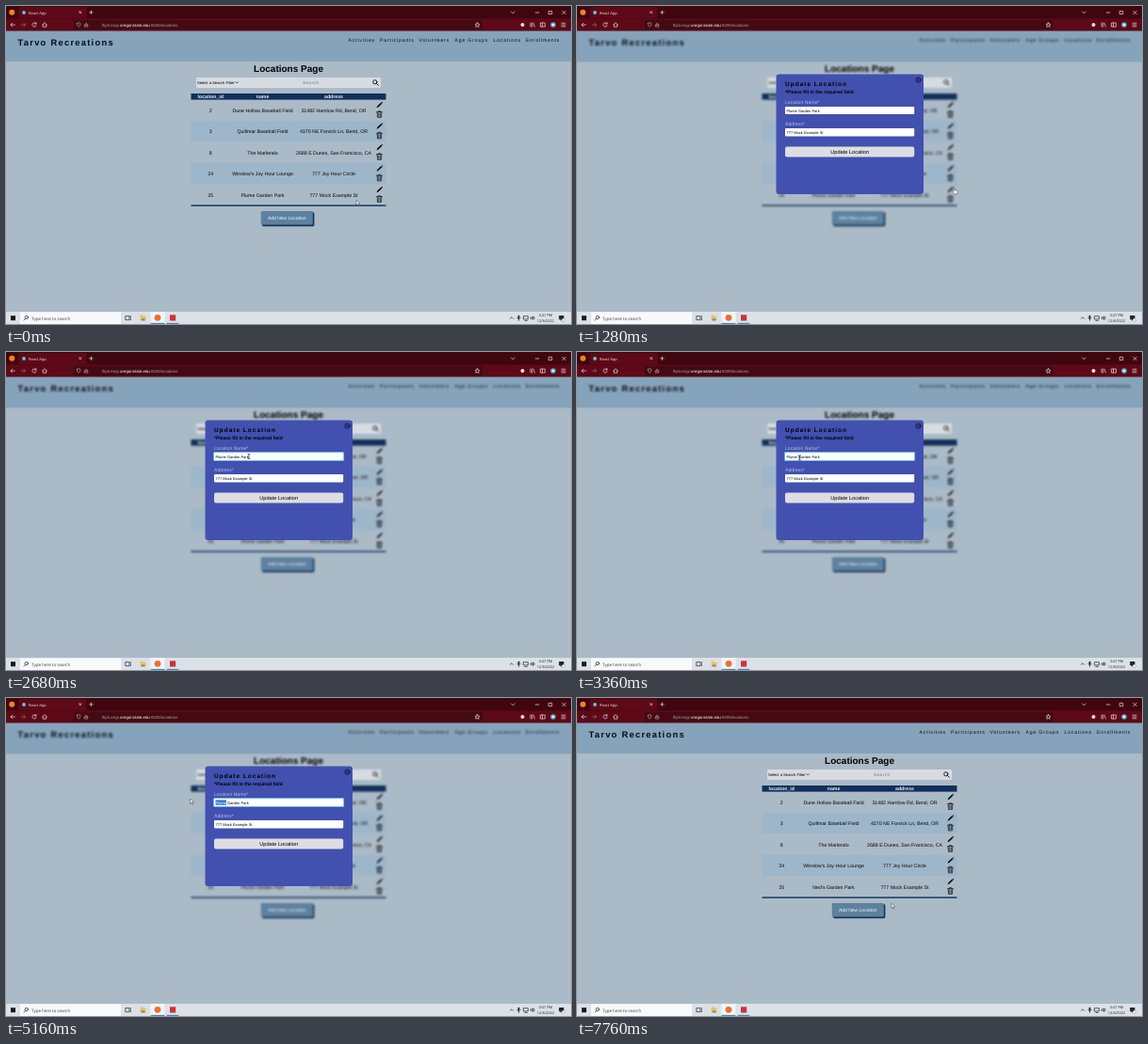
An HTML page that plays this animation: 600 by 338 pixels, repeating every 7800 ms.

```html
<!DOCTYPE html>
<html lang="en">
<head>
<meta charset="utf-8">
<title>Locations</title>
<style>
  html, body { margin: 0; width: 100%; height: 100%; overflow: hidden; background: #abbac7; }
  svg { display: block; width: 100vw; height: 100vh; }
  text { font-family: "Liberation Sans", Arial, sans-serif; text-rendering: geometricPrecision; white-space: pre; }
  .ui { font-family: "Open Sans", "Noto Sans", sans-serif; }
  .line { fill: none; stroke-width: .7; stroke-linecap: round; stroke-linejoin: round; }
</style>
</head>
<body>
<svg id="stage" viewBox="0 0 600 338" preserveAspectRatio="none">
  <defs>
    <g id="pencil">
      <path d="M-3 3 L-2.4 1.2 L1.7 -2.6 L2.8 -1.5 L-1.2 2.4 Z M2.1 -3 L2.7 -3.5 L3.7 -2.5 L3.2 -1.9 Z"/>
    </g>
    <g id="trash" class="line" stroke="#080a0d">
      <path d="M-3 -2.4 H3 M-1 -2.5 V-3.4 H1 V-2.5 M-2.3 -2.2 L-2 3.3 H2 L2.3 -2.2 M-.8 -1 V2.2 M.8 -1 V2.2"/>
    </g>
    <path id="arrow" d="M0 0 V5.2 L1.2 4.1 L2 6 L2.9 5.6 L2.1 3.8 H3.7 Z" fill="#fff" stroke="#111" stroke-width=".4"/>
    <path id="hand" d="M-.6 .3 Q0 -.4 .6 .3 V2.4 L3 3 Q3.5 3.2 3.4 4 L2.9 6.4 H0 L-1.9 3.9 Q-1.6 3 -.6 3.9 Z" fill="#fff" stroke="#111" stroke-width=".4"/>
    <path id="beam" d="M-1 -2.6 Q0 -2.6 0 -2 Q0 -2.6 1 -2.6 M0 -2 V2 M-1 2.6 Q0 2.6 0 2 Q0 2.6 1 2.6" class="line" stroke="#222"/>
  </defs>

  <rect width="600" height="338" fill="#abbac7"/>
  <rect y="20" width="600" height="39" fill="#85a3bb"/>
  <g id="page">
    <rect x="-10" y="16" width="620" height="43" fill="#85a3bb"/>
    <text x="12.5" y="42" font-size="9.4" font-weight="700" letter-spacing="1.25" fill="#090d12">Tarvo Recreations</text>
    <g id="nav" font-size="5.2" letter-spacing=".8" fill="#0b1118"></g>
    <text x="300" y="70.4" font-size="10" font-weight="700" text-anchor="middle">Locations Page</text>

    <rect x="202" y="76" width="196" height="11" rx="1" fill="#d6dce2"/>
    <text x="203" y="83" font-size="4.15">Select a Search Filter</text>
    <path d="M244 80.8 L245.2 82 L246.4 80.8" class="line" stroke="#111"/>
    <text x="315" y="83.2" font-size="4.6" letter-spacing=".5" fill="#707780">Search</text>
    <g class="line" stroke="#111" style="stroke-width:.9"><circle cx="391.8" cy="80.8" r="2.1"/><path d="M393.4 82.4 L395.4 84.4"/></g>

    <rect x="196.5" y="93" width="207" height="6.6" fill="#10305a"/>
    <g id="heads" font-size="5.2" font-weight="700" fill="#eef2f6" text-anchor="middle"></g>
    <g id="rows" font-size="5.25" text-anchor="middle" fill="#05070a"></g>
    <rect x="196.5" y="211.4" width="207" height="1.4" fill="#10305a"/>

    <rect x="272" y="219.2" width="55.4" height="15" rx="1.4" fill="#173657"/>
    <rect x="270.8" y="218" width="55" height="14.4" rx="1.2" fill="#5d81a0"/>
    <text x="298.2" y="227" font-size="5" text-anchor="middle" fill="#f4f7fa">Add New Location</text>
  </g>

  <g id="modal">
    <rect x="211.5" y="72.5" width="156.5" height="127.5" rx="3" fill="#4250b0"/>
    <text x="221" y="84.8" font-size="6.5" font-weight="700" letter-spacing="1">Update Location</text>
    <text x="221" y="93" font-size="5" font-weight="700">*Please fill in the required field</text>
    <g font-size="5.1" fill="#b9bfd9">
      <text x="221" y="104.2">Location Name*</text>
      <text x="221" y="127.3">Address*</text>
    </g>
    <rect id="focus" x="220.1" y="106" width="139" height="10" rx="1.3" fill="#6cb9ea"/>
    <rect x="221" y="106.9" width="137.2" height="8.2" rx=".8" fill="#fff"/>
    <rect x="221" y="130" width="137.2" height="8.4" rx=".8" fill="#fff"/>
    <rect id="selection" y="108.4" height="5.4" fill="#3478cf"/>
    <text x="222.5" y="112.5" font-size="4"><tspan id="word"></tspan><tspan> Garden Park</tspan></text>
    <rect id="caret" y="108.6" width=".4" height="5" fill="#111"/>
    <text x="222.5" y="135.7" font-size="4">777 Mock Example St</text>
    <rect x="221" y="149.4" width="137.2" height="11" rx="2" fill="#dddde2"/>
    <text x="289.7" y="156.9" font-size="5.6" text-anchor="middle">Update Location</text>
    <g class="line" stroke="#080a18"><circle cx="362.5" cy="78.6" r="2.7"/><path d="M361.4 77.5 l2.2 2.2 m0 -2.2 l-2.2 2.2"/></g>
  </g>

  <!-- browser frame -->
  <rect width="600" height="14" fill="#40060f"/>
  <rect y="13.4" width="600" height="13.1" fill="#5d0917"/>
  <rect x="13.5" y="1" width="72" height="12.4" rx="1" fill="#5d0917"/>
  <circle cx="6.3" cy="6.8" r="3" fill="#f08226"/>
  <circle cx="19" cy="7" r="1.9" fill="#61c5de"/>
  <text class="ui" x="24" y="8.5" font-size="4" fill="#f3e8ea">React App</text>
  <rect x="72" y="15" width="434" height="10" rx="1.2" fill="#430a13"/>
  <text x="102" y="21.7" font-size="4.4" fill="#b79ba0">flip3.engr.<tspan fill="#fff">oregonstate.edu</tspan>:9205/locations</text>
  <g class="line" stroke="#eadde0">
    <path d="M77.7 5.6 l2.2 2.2 m0 -2.2 l-2.2 2.2 M88.6 6.8 h3.6 M90.4 5 v3.6"/>
    <path d="M536.4 6 l1.8 1.8 l1.8 -1.8 M562.3 7 h3.6 M576.6 5.4 h3.2 v3.2 h-3.2 Z M590.8 5.3 l3.4 3.4 m0 -3.4 l-3.4 3.4"/>
    <path d="M9.4 20 H5 M6.8 18.2 L5 20 L6.8 21.8"/>
    <path d="M16.2 20 H20.6 M18.8 18.2 L20.6 20 L18.8 21.8" stroke="#9c6c74"/>
    <path d="M31.8 18.7 A2.1 2.1 0 1 0 32.1 20.6 M32 17.6 V19 H30.6"/>
    <path d="M38.6 20 L41 17.7 L43.4 20 M39.3 19.6 V22.2 H42.7 V19.6"/>
    <path d="M75.4 18.4 L77.2 17.6 L79 18.4 Q79 21.4 77.2 22.3 Q75.4 21.4 75.4 18.4 Z" stroke="#b79ba0"/>
    <path d="M83.6 20 H86.8 V22 H83.6 Z M84.2 20 V19 Q85.2 17.2 86.2 19 V20" stroke="#b79ba0"/>
    <path d="M500.5 17.6 l.8 1.6 l1.7 .2 l-1.3 1.2 l.4 1.7 l-1.6 -.9 l-1.6 .9 l.4 -1.7 l-1.3 -1.2 l1.7 -.2 Z"/>
    <path d="M557 18 V22 M558.6 18 V22 M560 18 L561.4 22 M567.8 18 H572.4 V22 H567.8 Z M569.5 18 V22"/>
    <path d="M590 18.2 H594 M590 20 H594 M590 21.8 H594"/>
  </g>
  <circle cx="548.5" cy="20" r="2" fill="#eadde0"/>
  <circle cx="581" cy="20" r="2.8" fill="#58a9d8"/>
  <circle cx="581" cy="20" r="1.3" fill="#e9f3f8"/>

  <!-- taskbar -->
  <rect y="325" width="600" height="13" fill="#dce1e8"/>
  <rect x="5" y="329.2" width="5" height="5" fill="#15181c"/>
  <rect x="15" y="325.4" width="107" height="12.6" fill="#f8f9fa"/>
  <g class="line" stroke="#22262b"><circle cx="21.8" cy="331" r="1.7"/><path d="M20.6 332.3 L19 334"/></g>
  <text class="ui" x="27" y="333.5" font-size="4.5" fill="#3a3e44">Type here to search</text>
  <path d="M127.2 329.6 h3.8 v4 h-3.8 Z M132.4 329.4 v1 m0 1.2 v2.2" class="line" stroke="#22262b"/>
  <path d="M142.6 328.6 h2.3 l.8 .9 h2.8 v5 h-5.9 Z" fill="#f1c24e"/>
  <rect x="143.8" y="332.4" width="3.6" height="2" fill="#4596d6"/>
  <rect x="153.4" y="325" width="15.2" height="13" fill="#f1f4f7"/>
  <circle cx="161" cy="331.3" r="3.4" fill="#ee6f2d"/>
  <rect x="174" y="328.3" width="6.2" height="6.2" fill="#cf303c"/>
  <path d="M153.6 337.4 H168.4 M170.6 337.4 H183.4" stroke="#2c7cc0" stroke-width="1"/>
  <g class="line" stroke="#1f2328">
    <path d="M535.4 332.3 l1.6 -1.6 l1.6 1.6 M542.9 331.5 q1.6 3 3.2 0 M544.5 333 v1.4"/>
    <path d="M549.8 329.7 h4.6 v3.2 h-4.6 Z M551 334.4 h2.4 M557.4 331 h1 l1.2 -1.2 v3.6 l-1.2 -1.2 h-1 Z M560.8 330.4 q1 1.2 0 2.4"/>
  </g>
  <rect x="543.6" y="328.7" width="1.8" height="3.6" rx=".9" fill="#1f2328"/>
  <g class="ui" font-size="3.9" text-anchor="middle" fill="#1f2328">
    <text class="ui" x="573" y="330.2">3:47 PM</text>
    <text class="ui" x="573" y="336.3">12/6/2022</text>
  </g>
  <path d="M587.2 329 h5.2 v4.3 h-2 l-1.4 1.5 v-1.5 h-1.8 Z" fill="#20242a"/>
  <circle cx="592" cy="333.8" r="1.7" fill="#f5f6f7" stroke="#555" stroke-width=".3"/>

  <use id="cursor" href="#arrow"/>
</svg>
<script>
const LOOP = 7800, STEP = 40;
const $ = id => document.getElementById(id);
const clamp = v => Math.max(0, Math.min(1, v));
const ease = v => v * v * (3 - 2 * v);

const OLD_WORD = 'Plume', NEW_WORD = "Ned's", REST = ' Garden Park';
const nav = [['Activities', 363.5], ['Participants', 397], ['Volunteers', 438.5],
  ['Age Groups', 476.5], ['Locations', 517.5], ['Enrollments', 552]];
const heads = [['location_id', 217.3], ['name', 272.5], ['address', 348]];
const places = [
  [2, 'Dune Hollow Baseball Field', '31482 Hamlow Rd, Bend, OR'],
  [3, 'Quillmar Baseball Field', '4370 NE Forvick Ln, Bend, OR'],
  [8, 'The Marlendo', '2688 E Dunes, San Francisco, CA'],
  [24, "Winslow's Joy Hour Lounge", '777 Joy Hour Circle'],
  [25, OLD_WORD + REST, '777 Mock Example St']
];

const label = (x, y, s) => `<text x="${x}" y="${y}">${s}</text>`;
$('nav').innerHTML = nav.map(([s, x]) => label(x, 38, s)).join('');
$('heads').innerHTML = heads.map(([s, x]) => label(x, 98, s)).join('');
$('rows').innerHTML = places.map((cells, i) => {
  const y = 110.6 + i * 22.5;
  const stripe = i % 2 ? `<rect x="196.5" y="${y - 11.2}" width="207" height="22.5" fill="#9eb6c9"/>` : '';
  return stripe + cells.map((s, c) => label(heads[c][1], y + 1.9, s)).join('') +
    `<use href="#pencil" x="396.6" y="${y - 5.4}"/><use href="#trash" x="396.5" y="${y + 4.5}"/>`;
}).join('');
const lastName = $('rows').querySelectorAll('text')[13];

// Pointer stops: time, x, y
const path = [
  [0, 372, 206.2], [40, 372, 206.2], [520, 400.8, 193.4], [1380, 400.8, 193.4],
  [1880, 271.3, 120], [2160, 258, 111], [2680, 258, 111], [3320, 236.4, 112.4],
  [3800, 235.5, 112], [4520, 206, 110], [4680, 206, 110], [5080, 195.7, 107],
  [6900, 195.7, 107], [7240, 296, 155], [7360, 296, 155], [7720, 333.8, 218.2]
];
const typing = [[5440, 1], [5840, 2], [6000, 3], [6200, 4], [6440, 5]];
const FOCUS = 2440, DRAG = 3800, OPEN = 880, CLOSE = 7360;

function pointer(t) {
  const next = path.findIndex(p => p[0] > t);
  if (next < 0) return path[path.length - 1].slice(1);
  const [t0, x0, y0] = path[next - 1], [t1, x1, y1] = path[next];
  const k = ease((t - t0) / (t1 - t0));
  return [x0 + (x1 - x0) * k, y0 + (y1 - y0) * k];
}

function pointerShape(t, x, y, open) {
  if (t < 1420) return t >= 440 ? 'hand' : 'arrow';
  if (!open) return 'arrow';
  const inX = x > 221 && x < 358;
  if (inX && y > 149 && y < 161) return 'hand';
  return inX && (y > 106 && y < 116 || y > 130 && y < 138.5) ? 'beam' : 'arrow';
}

function render(t) {
  const [x, y] = pointer(t);
  const shown = clamp((t - OPEN) / 240) * (1 - clamp((t - CLOSE) / 160));
  $('page').style.filter = shown ? `blur(${shown * .9}px)` : 'none';
  $('modal').setAttribute('opacity', shown);
  lastName.textContent = (t >= 7440 ? NEW_WORD : OLD_WORD) + REST;

  const typed = typing.reduce((n, [at, count]) => t >= at ? count : n, 0);
  const word = $('word');
  word.textContent = typed ? NEW_WORD.slice(0, typed) : OLD_WORD;
  const end = 222.5 + word.getComputedTextLength();
  const start = Math.max(222.5, Math.min(end, x));
  const selecting = t >= DRAG && !typed;
  $('selection').setAttribute('x', start);
  $('selection').setAttribute('width', selecting ? end - start : 0);
  word.setAttribute('fill', selecting && start < 225 ? '#fff' : '#000');

  const focused = t >= FOCUS;
  $('focus').setAttribute('opacity', focused ? 1 : 0);
  const blinkOn = typed > 0 && t < 6480 && !(t >= 5680 && t < 5840);
  $('caret').setAttribute('x', end + .2);
  $('caret').setAttribute('opacity', blinkOn ? 1 : 0);

  const cursor = $('cursor');
  cursor.setAttribute('href', '#' + pointerShape(t, x, y, shown > 0));
  cursor.setAttribute('transform', `translate(${x} ${y})`);
}

const begin = performance.now();
function tick() {
  const t = (performance.now() - begin) % LOOP;
  render(Math.floor(t / STEP) * STEP);
  requestAnimationFrame(tick);
}
tick();
</script>
</body>
</html>
```
